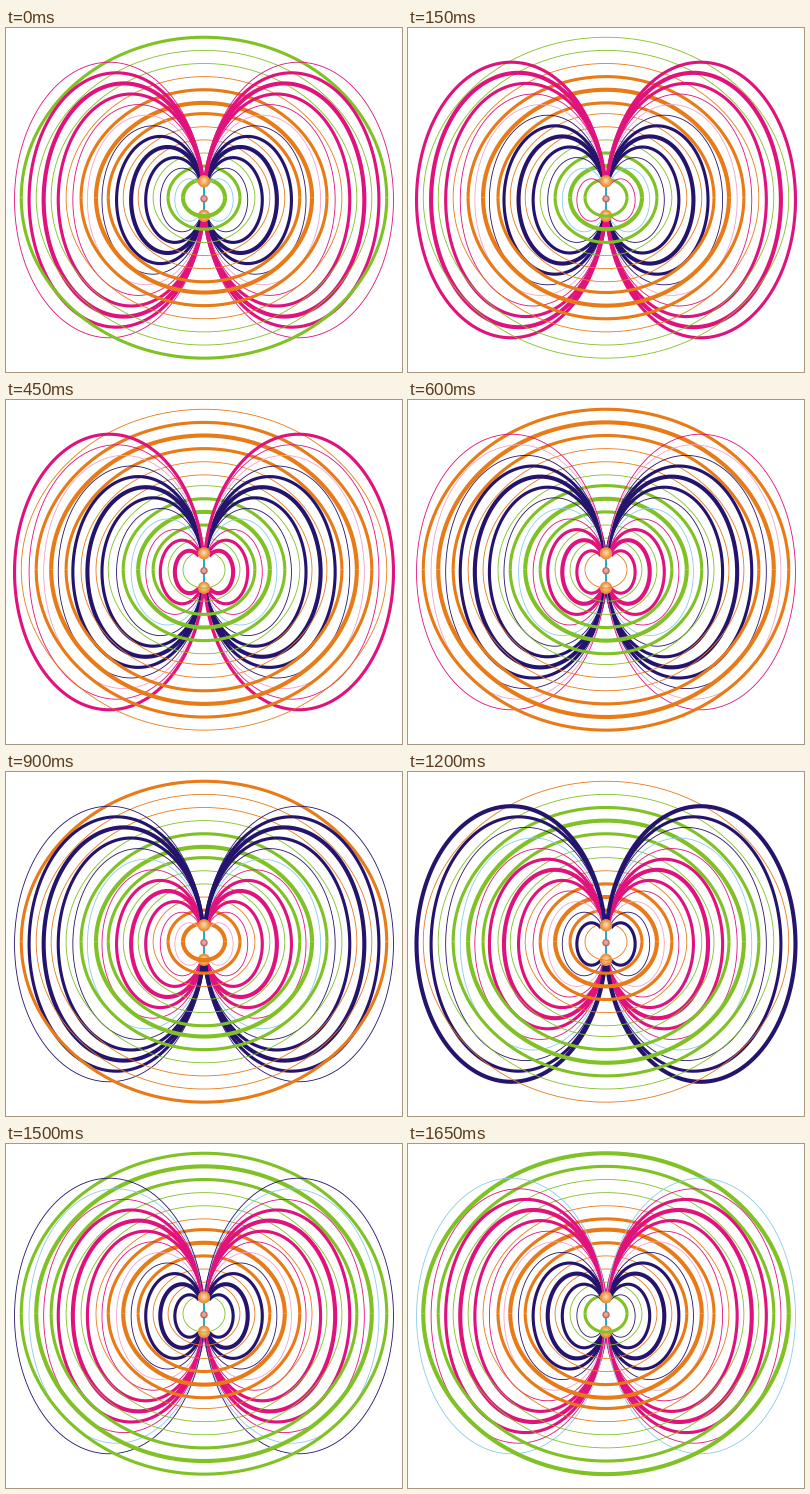
A matplotlib script that plays this animation: 396x344 px, repeating every 1800 ms.

```python
import numpy as np
import matplotlib.pyplot as plt
from matplotlib.animation import FuncAnimation
from matplotlib.patches import Circle

W, H, DPI = 396, 344, 100
PX = 72 / DPI
STEPS, COUNT = 12, 12
CX = 198

GREEN, ORANGE = "#80c225", "#e87b17"
PINK, NAVY = "#e0127c", "#25146e"
SKY, ROSE = "#8ccbee", "#f2a3cb"

fig = plt.figure(figsize=(W / DPI, H / DPI), dpi=DPI, facecolor="white")
ax = fig.add_axes([0, 0, 1, 1])
ax.set_xlim(0, W)
ax.set_ylim(H, 0)
ax.axis("off")


def curve(x, y, zorder):
    return ax.plot(x, y, zorder=zorder, solid_capstyle="butt")[0]


def make_ring(k):
    """Horizontal ring: far half behind the loops, near half in front."""
    half_wave, place = divmod(k - 1, 6)
    rx = 21 + 87 * half_wave + 14.95 * place
    ry = 0.878 * rx
    halves = []
    for start, zorder in ((np.pi, 1), (0, 6)):
        a = np.linspace(start, start + np.pi, 150)
        halves.append(curve(CX + rx * np.cos(a), 169.7 + ry * np.sin(a), zorder))
    return halves


def make_loop(k):
    """Pair of mirrored loops that open between the two charges."""
    rx, ry = 7.288 * (k + 1), 10.6 * (k + 1)
    gap = np.arcsin(16 / ry)
    a = np.linspace(gap, 2 * np.pi - gap, 260)
    dx, y = rx * (1 - np.cos(a)), 172 + ry * np.sin(a)
    return [curve(CX + side * dx, y, 3) for side in (-1, 1)]


def ball(x, y, r, tones, zorder):
    for i, tone in enumerate(tones):
        shrink = 1 - i / len(tones)
        ax.add_patch(Circle((x, y - 0.15 * r * (1 - shrink)), r * shrink,
                            facecolor=tone, edgecolor="none", zorder=zorder))


rings = [make_ring(k) for k in range(1, COUNT + 1)]
loops = [make_loop(k) for k in range(1, COUNT + 1)]

ax.plot([CX, CX], [153, 188], color="#2aa9c9", lw=2 * PX, zorder=4)
for y in (153.3, 187.8):
    ball(CX, y, 6.2, ("#e88f3c", "#f0a355", "#f6bd82", "#fad3a8"), 5)
ball(CX, 170.8, 3.7, ("#b9645c", "#e39a8c", "#e8a89b"), 5)


def wave(k, step, start, colors):
    """Signed distance to the nearest crest and that crest's colour."""
    d = k - start - step
    crest = (d + 3) // 6
    return d - 6 * crest, colors[crest % 2]


def style(lines, offset, color):
    width = {0: 4.1, 1: 3.1}.get(abs(offset), 0.85)
    for line in lines:
        line.set_color(color)
        line.set_linewidth(width * PX)


def draw(step):
    for k in range(1, COUNT + 1):
        offset, color = wave(k, step, 1, (GREEN, ORANGE))
        style(rings[k - 1], offset, color)
        offset, color = wave(k, step, 4, (NAVY, PINK))
        if offset == -3:
            color = SKY if color == NAVY else ROSE
        style(loops[k - 1], offset, color)
    return [line for group in rings + loops for line in group]


anim = FuncAnimation(fig, draw, frames=STEPS, interval=150,
                     repeat=True, repeat_delay=0, blit=False)
plt.show()
```
